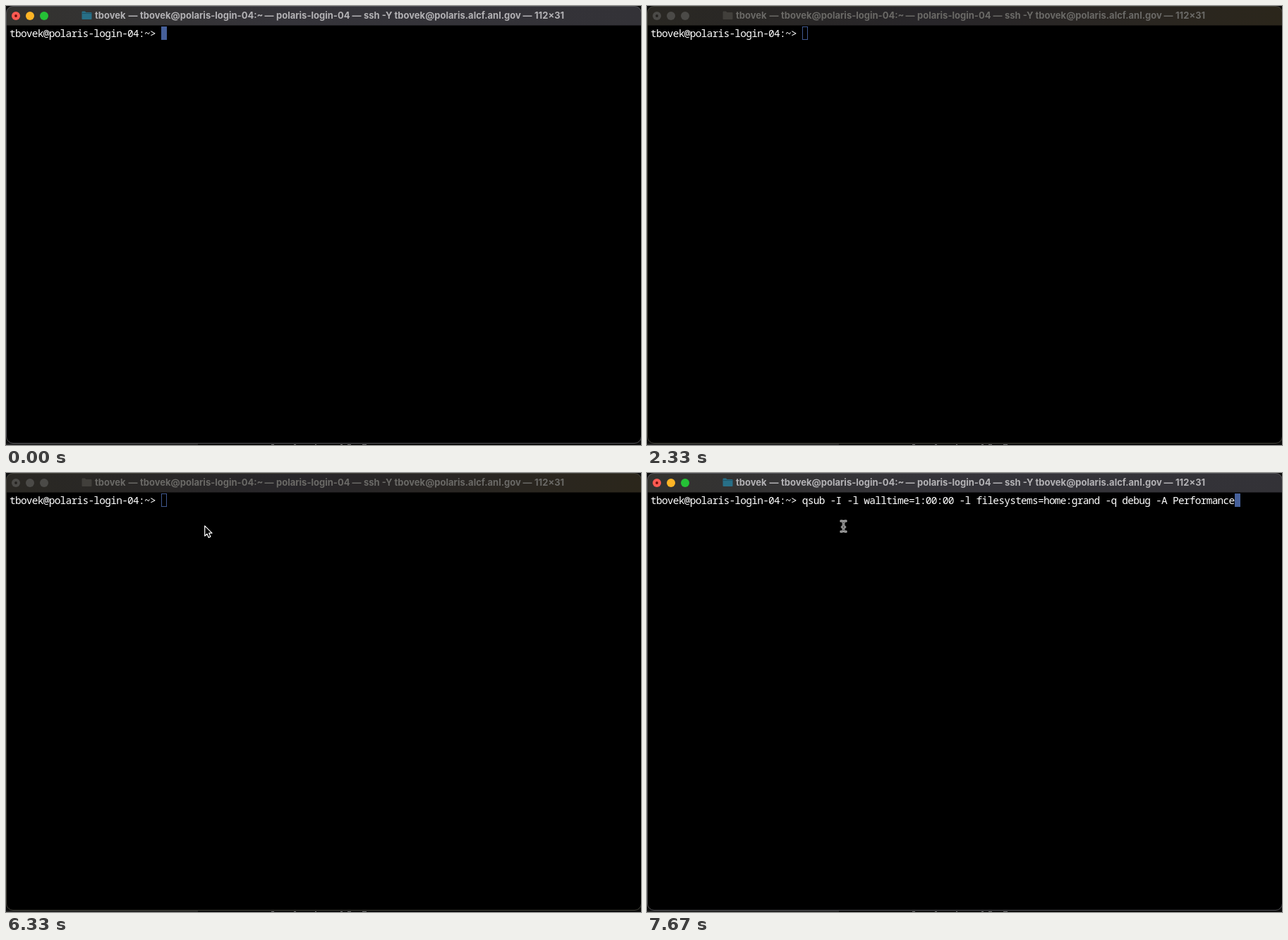
Write an HTML page that moves like this. It is 900 px wide and 622 px high and loops after 8 s.

```html
<!DOCTYPE html>
<html lang="en">
<head>
<meta charset="utf-8">
<title>Terminal session</title>
<style>
  html, body { margin: 0; width: 100%; height: 100%; overflow: hidden; background: #0c0c0c; }
  svg { display: block; width: 100vw; height: 100vh; }
  text { white-space: pre; }
  .title { font: 700 13px Inter, sans-serif; }
  .shell { font: 500 14.5px "Noto Sans Mono", monospace; letter-spacing: -.743px; fill: #fff; }

  .active, .inactive, .block, .arrow, .beam, .command { animation: 8s step-end infinite; }
  .active { animation-name: active; }
  .inactive { animation-name: inactive; }
  .block { animation-name: blink; }
  .arrow { animation-name: arrow; }
  .beam { animation-name: beam; }
  .command { animation-name: paste; }

  @keyframes active {
    0%, 83.375% { opacity: 1; }
    29.125% { opacity: 0; }
  }
  @keyframes inactive {
    0%, 83.375% { opacity: 0; }
    29.125% { opacity: 1; }
  }
  @keyframes blink {
    0%, 16.625%, 83.375% { opacity: 1; transform: none; }
    8.375%, 20.875%, 87.5% { opacity: 0; transform: none; }
    91.625%, 100% { opacity: 1; transform: translateX(613px); }
  }
  @keyframes paste {
    0% { opacity: 0; }
    91.625%, 100% { opacity: 1; }
  }
  @keyframes arrow {
    0% { opacity: 0; transform: translate(270px, 139px); }
    75% { opacity: 1; transform: translate(270px, 139px); }
    79.125% { opacity: 1; transform: translate(281px, 74px); }
    83.375%, 100% { opacity: 0; transform: translate(281px, 74px); }
  }
  @keyframes beam {
    0% { opacity: 0; transform: translate(282px, 68.5px); }
    83.375% { opacity: 1; transform: translate(282px, 68.5px); }
    87.5% { opacity: 1; transform: translate(281.5px, 69px); }
    91.625% { opacity: 1; transform: translate(280px, 72px); }
    95.875%, 100% { opacity: 1; transform: translate(278.5px, 75.5px); }
  }
</style>
</head>
<body>
<svg viewBox="0 0 900 622" preserveAspectRatio="none">
  <defs>
    <linearGradient id="barOn">
      <stop offset="0" stop-color="#33322f"/>
      <stop offset=".45" stop-color="#35343a"/>
      <stop offset="1" stop-color="#333237"/>
    </linearGradient>
    <linearGradient id="barOff">
      <stop offset="0" stop-color="#2a2823"/>
      <stop offset=".45" stop-color="#28262a"/>
      <stop offset="1" stop-color="#2b261b"/>
    </linearGradient>
    <path id="bar" d="M.5 27.5V10Q.5.5 10 .5H891Q900.5.5 900.5 10V27.5Z"/>
    <rect id="frame" x=".5" y=".5" width="900" height="619" rx="9.5" fill="none"/>
    <path id="folder" d="M107.5 8.5Q107.5 7.5 108.5 7.5H112L113.5 9H120.5Q121.5 9 121.5 10V18Q121.5 19 120.5 19H108.5Q107.5 19 107.5 18Z"/>
    <text id="title" class="title" y="18">
      <tspan x="126">tbovek</tspan><tspan x="173.5">—</tspan><tspan x="190">tbovek@polaris-login-04:~</tspan><tspan x="366.5">—</tspan><tspan x="383">polaris-login-04</tspan><tspan x="490.5">—</tspan><tspan x="507">ssh -Y tbovek@polaris.alcf.anl.gov</tspan><tspan x="732.5">—</tspan><tspan x="749">112×31</tspan>
    </text>
    <path id="ibeam" d="M-3.5 -7.5Q-.5 -7.5 0 -5.5Q.5 -7.5 3.5 -7.5M0 -5.5V5.5M-3.5 7.5Q-.5 7.5 0 5.5Q.5 7.5 3.5 7.5M-2 1H2" fill="none" stroke-linecap="round"/>
  </defs>

  <rect width="900" height="622" fill="#0c0c0c"/>
  <path d="M0 621H272" stroke="#242424" stroke-width="2"/>
  <path d="M376 621.5H380M408 621.5H411M438 621.5H440M474 621.5H477M484 621.5H489M505 621.5H511" stroke="#777"/>
  <rect width="901" height="620" rx="10"/>

  <g class="active">
    <use href="#bar" fill="url(#barOn)"/>
    <use href="#frame" stroke="#555559"/>
    <circle cx="14" cy="14" r="6" fill="#ff5a52"/>
    <circle cx="14" cy="14" r="1.9" fill="#710f0b"/>
    <circle cx="34" cy="14" r="6" fill="#fdb526"/>
    <circle cx="54" cy="14" r="6" fill="#25c136"/>
    <use href="#folder" fill="#286f87"/>
    <path d="M108 10.5H121.5" stroke="#1d5468"/>
    <use href="#title" fill="#b3b2b5"/>
    <rect class="block" x="220" y="29" width="8" height="19" fill="#46609a"/>
  </g>

  <g class="inactive">
    <use href="#bar" fill="url(#barOff)"/>
    <use href="#frame" stroke="#45443c"/>
    <g fill="#4b4a47">
      <circle cx="14" cy="14" r="6"/>
      <circle cx="34" cy="14" r="6"/>
      <circle cx="54" cy="14" r="6"/>
    </g>
    <circle cx="14" cy="14" r="1.9" fill="#24221f"/>
    <use href="#folder" fill="#413f3b"/>
    <use href="#title" fill="#6a6966"/>
    <rect x="220.5" y="29.5" width="7" height="18" fill="none" stroke="#40588f"/>
  </g>

  <text class="shell" x="5" y="44">tbovek@polaris-login-04:~&gt;</text>
  <text class="shell command" x="219.8" y="44">qsub -I -l walltime=1:00:00 -l filesystems=home:grand -q debug -A Performance</text>

  <path class="arrow" d="M.7 .9V15.2L4 12.2L6.2 17.4L8.9 16.2L6.7 11.2H11Z" fill="#000" stroke="#fff" stroke-width="1.2" stroke-linejoin="round"/>
  <g class="beam">
    <use href="#ibeam" stroke="#fff" stroke-width="3"/>
    <use href="#ibeam" stroke="#111" stroke-width="1"/>
  </g>
</svg>
</body>
</html>
```
